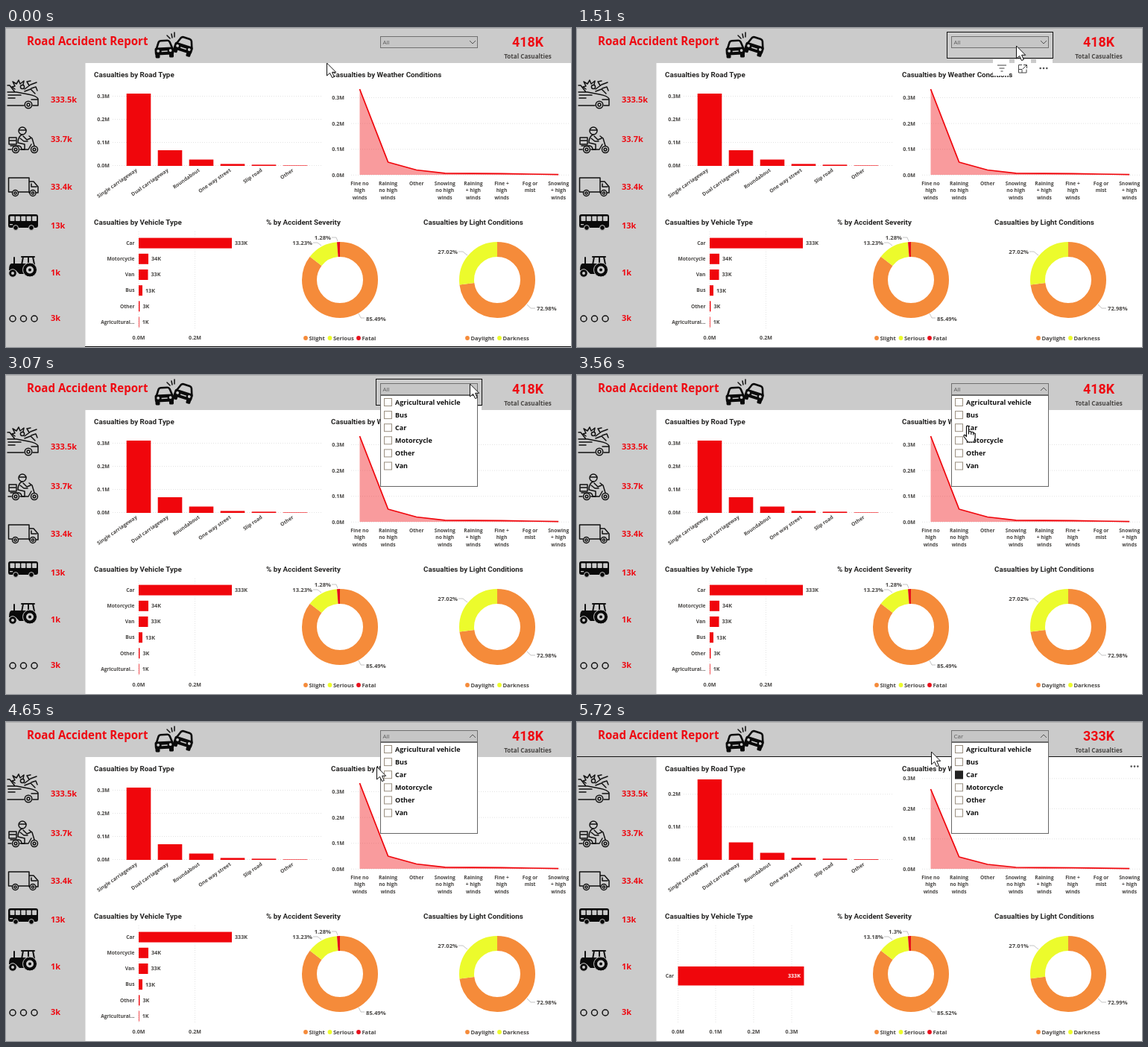
Animation, 758 px wide and 428 px high, one loop 8000 ms. Source, as an HTML page:

```html
<!DOCTYPE html>
<html lang="en">
<head>
<meta charset="utf-8">
<title>Road Accident Report</title>
<style>
html, body { margin: 0; width: 100%; height: 100%; overflow: hidden; background: #fff; }
svg { display: block; width: 758px; height: 428px; }
text { font-family: "Open Sans", "Noto Sans", sans-serif; font-weight: 700; fill: #484644; }
.din { font-family: Roboto, Arial, sans-serif; font-weight: 700; fill: #252423; }
.red { font-weight: 700; fill: #ee0a12; }
.grid { stroke: #dcdcdc; stroke-width: .8; stroke-dasharray: 1 2; fill: none; }
.lead { stroke: #b5b5b5; stroke-width: .8; fill: none; }
.line { fill: none; stroke: #111; stroke-width: 1.5; stroke-linecap: round; stroke-linejoin: round; }
.hover { fill: none; stroke: #111; stroke-width: 1; }
</style>
</head>
<body>
<svg id="stage" viewBox="0 0 758 428"></svg>
<script>
const LOOP = 8000, RED = '#f0060c', ORANGE = '#f58b3a', YELLOW = '#ecfb2c', GREY = '#cbcbcb';
const stage = document.getElementById('stage');

// Markup helpers
const text = (x, cy, s, size, anchor = 'start', attrs = '') =>
  `<text x="${x}" y="${cy + size * .34}" font-size="${size}" text-anchor="${anchor}" ${attrs}>${s}</text>`;
const rect = (x, y, w, h, fill, attrs = '') =>
  `<rect x="${x}" y="${y}" width="${w}" height="${h}" fill="${fill}" ${attrs}/>`;
const circle = (x, y, r, attrs = '') => `<circle cx="${x}" cy="${y}" r="${r}" ${attrs}/>`;
const path = (d, attrs = 'class="line"') => `<path d="${d}" ${attrs}/>`;
const group = (id, body) => `<g id="${id}">${body}</g>`;
const title = (x, y, s) => text(x, y, s, 9.8, 'start', 'class="din"');
const mix = (a, b, p) => a + (b - a) * p;

function crashCar(x, y, turn) {
  return `<g transform="translate(${x} ${y}) rotate(${turn})">` +
    path('M-10-1L-7-9Q-6-11-4-11H5Q7-11 8-9L11-1', 'fill="none" stroke="#0a0a0a" stroke-width="2.6"') +
    rect(-12.5, -2, 25.5, 10, '#0a0a0a', 'rx="2.5"') +
    rect(-12, 5, 6, 7, '#0a0a0a', 'rx="1.5"') + rect(6.5, 5, 6, 7, '#0a0a0a', 'rx="1.5"') +
    circle(-8, 2.5, 1.9, `fill="${GREY}"`) + circle(8.5, 2.5, 1.9, `fill="${GREY}"`) +
    rect(-3.5, 2.5, 8, 1.5, GREY) + '</g>';
}

function icons() {
  const wheel = (x, y, r) => circle(x, y, r, 'class="line"') + circle(x, y, r * .4, 'class="line"');
  const crash = crashCar(212, 28, -3) + crashCar(238.500, 24, 18) +
    path('M223 13L222 8M226 12V6M220 14L216 10');
  const hit = path('M2 86H14L30 89Q41 91 43 95V104H36M24 104H2M3 90H20M12 86L5 77H2M34 96H42M3 94H12') +
    wheel(30, 103, 4.8) +
    path('M12 82L8 79L12 78L9 72L14 75L17 70L19 75L24 71L23 76') +
    circle(22, 79, 2.6, 'class="line"') +
    path('M25 82L33 76L41 73M25 85L33 82L39 88M31 77L28 72L33 71M34 81L40 79L42 84');
  const scooter = circle(22, 138, 5, 'class="line"') + path('M18 137H27M22 143Q16 145 16 154L25 156L25 163H19') +
    path('M23 145L28 150L33 148M31 145L35 148L38 158M19 148L24 152H29') +
    rect(4, 147, 10, 9, 'none', 'class="line"') + path('M5 151H13M6 158H17Q21 159 21 163H30L34 156M3 163H7') +
    wheel(13, 163, 4.5) + wheel(38, 163, 4.5);
  const van = path('M8 220H3.500V201H31V220H17M31 206H37L43 213V221H40M32 221H31M34 209V213H41') +
    wheel(12.500, 221.500, 4) + wheel(36, 221.500, 4);
  let bus = rect(3, 250, 40, 18, '#0a0a0a', 'rx="3"');
  for (let i = 0; i < 5; i++) bus += rect(5.5 + i * 7.4, 252.5, 6, 6.5, GREY, 'rx=".8"');
  bus += rect(5, 263, 4, 1.3, GREY);
  for (const x of [13, 34]) bus += circle(x, 268, 3.4, `fill="#0a0a0a" stroke="${GREY}"`);
  const tractor = '<g transform="translate(46 0) scale(-1 1)">' +
    path('M8 307H25M10 307L8 317M23 307L25 318M16 308V316', 'class="line" style="stroke-width:2"') +
    path('M24 316H39Q42 317 42 325H33L28 330H22L18 316Z', 'fill="#0a0a0a"') +
    path('M35 316V308', 'class="line" style="stroke-width:2"') +
    circle(14, 324.5, 9.5, `fill="#0a0a0a" stroke="${GREY}"`) + circle(14, 324.5, 5, `fill="${GREY}"`) + circle(14, 324.5, 2) +
    circle(37, 329, 5.3, `fill="#0a0a0a" stroke="${GREY}"`) + circle(37, 329, 2, `fill="${GREY}"`) + '</g>';
  const dots = [9, 23.5, 38].map(x => circle(x, 390, 4, 'class="line"')).join('');
  return crash + hit + scooter + van + bus + tractor + dots;
}

function roadChart(p) {
  const a = [97, 21, 8.5, 2.6, 1.6, .6], b = [108, 23.500, 9.5, 2.8, 1.7, .8];
  const step = mix(31, 43.8, p);
  let out = '';
  for (let i = 0, y = 184.5; y > 72; y = 184.5 - step * ++i)
    out += path(`M143 ${y}H424`, 'class="grid"') + text(139, y, `0.${i}M`, 7.1, 'end');
  a.forEach((v, i) => {
    const h = mix(v, b[i], p);
    out += rect(161.700 + i * 42, 185 - h, 32.6, h, RED);
  });
  return out;
}

function weatherChart(p) {
  const a = [115, 17, 6.500, 2.2, 1.8, 1.6, 1, .3], b = [107, 16, 6, 2, 1.7, 1.5, .9, .3];
  const step = mix(34.6, 40.5, p);
  let out = '';
  for (let i = 0; i < 4; i++) {
    const y = 197.3 - step * i;
    out += path(`M463 ${y}H755`, 'class="grid"') + text(454, y, `0.${i}M`, 7.1, 'end');
  }
  const pts = a.map((v, i) => `${474.500 + i * 38.1} ${197 - mix(v, b[i], p)}`).join('L');
  return out + path(`M474.500 197L${pts}V197Z`, 'fill="#f0060c" fill-opacity=".4"') +
    path(`M${pts}`, `fill="none" stroke="${RED}" stroke-width="1.7" stroke-linejoin="round"`);
}

function axis(ticks) {
  return ticks.map(([x, s]) => path(`M${x} 273V405`, 'class="grid"') + text(x, 416, s, 7.1, 'middle')).join('');
}

function vehicleAll() {
  const rows = [['Car', 125, '333K'], ['Motorcycle', 13, '34K'], ['Van', 12.5, '33K'],
    ['Bus', 5, '13K'], ['Other', 1.4, '3K'], ['Agricultural...', .7, '1K']];
  return axis([[178, '0.0M'], [253.500, '0.2M']]) + rows.map(([name, w, s], i) => {
    const y = 288.600 + i * 21.2;
    return text(172.500, y, name, 6.7, 'end') + rect(178, y - 7, w, 14, RED) + text(182 + w, y, s, 7.2);
  }).join('');
}

function vehicleCar() {
  return axis([[135.5, '0.0M'], [186, '0.1M'], [237, '0.2M'], [288, '0.3M']]) +
    text(130, 341, 'Car', 6.7, 'end') + rect(135.500, 328, 169, 25.5, RED) +
    text(300, 341, '333K', 7.2, 'end', 'style="fill:#fff"');
}

function donut(x, parts) {
  let from = 0;
  return parts.map(([share, color]) => {
    const arc = circle(x, 338, 41, `fill="none" stroke="${color}" stroke-width="20" pathLength="100"
      stroke-dasharray="${share} ${100 - share}" stroke-dashoffset="${-from}" transform="rotate(-90 ${x} 338)"`);
    from += share;
    return arc;
  }).join('');
}

function severity(slight, serious, fatal) {
  return donut(448, [[slight, ORANGE], [serious, YELLOW], [fatal, '#e8101c']]) +
    path('M412 288H418L423 292M437 281H443L445 286M473 383L476 389H481', 'class="lead"') +
    text(411, 288, serious + '%', 7.7, 'end') + text(436, 281, fatal + '%', 7.7, 'end') +
    text(483, 390, slight + '%', 7.7);
}

function light(day, dark) {
  return donut(659, [[day, ORANGE], [dark, YELLOW]]) +
    path('M607 300H613L619 305M699 371L704 376H710', 'class="lead"') +
    text(606, 300, dark + '%', 7.7, 'end') + text(712, 376, day + '%', 7.7);
}

const legend = items => items.map(([x, s, color]) =>
  circle(x, 416, 2.9, `fill="${color}"`) + text(x + 4.4, 416, s, 7.6)).join('');

function labels() {
  const roads = ['Single carriageway', 'Dual carriageway', 'Roundabout', 'One way street', 'Slip road', 'Other'];
  const skies = ['Fine no|high|winds', 'Raining|no high|winds', 'Other', 'Snowing|no high|winds',
    'Raining|+ high|winds', 'Fine +|high|winds', 'Fog or|mist', 'Snowing|+ high|winds'];
  return roads.map((s, i) => `<g transform="translate(${175 + i * 42} 190) rotate(-35)">${text(0, 0, s, 6.8, 'end')}</g>`).join('') +
    skies.map((s, i) => s.split('|').map((line, k) =>
      text(474.500 + i * 38.1, 208.5 + k * 9.5, line, 6.7, 'middle')).join('')).join('');
}

function dropdown() {
  const names = ['Agricultural vehicle', 'Bus', 'Car', 'Motorcycle', 'Other', 'Van'];
  return rect(502.5, 27.5, 130, 122, '#fff', 'stroke="#666"') + names.map((s, i) => {
    const y = 36.5 + i * 17.1;
    return rect(507.5, y - 5, 10, 10, '#fff', 'stroke="#9a8f80"') +
      text(522, y, s, 9, 'start', 'style="fill:#111"');
  }).join('') + group('tick', rect(507, 65.5, 11, 11, '#222'));
}

const more = (x, y) => [-4.3, 0, 4.3].map(d => circle(x + d, y, 1.3, 'fill="#555"')).join('');
const tools = [558, 587, 616].map(x => rect(x, 42, 22, 22, '#fff')).join('') +
  path('M564 50H576M566.500 54H573.5M568.5 58H571.5', 'fill="none" stroke="#444"') +
  path('M597 49.5H592.5V60H603V55.5M599 49.5H603.5V54M603 50L598 55M592.500 55.500H597V60', 'fill="none" stroke="#444"') +
  more(626, 54);

const counts = [[96, '333.5k'], [149, '33.7k'], [213, '33.4k'], [265, '13k'], [328, '1k'], [389, '3k']];
const total = s => text(700, 19, s, 17.8, 'middle', 'class="din" style="fill:#ee0a12"');
const pick = s => text(505.500, 19.5, s, 8, 'start', 'style="fill:#5c5c5c;font-weight:400"');

stage.innerHTML =
  rect(0, 0, 758, 428, GREY) + rect(0, 0, 758, 1, '#b0b0b0') + rect(106.500, 47, 651.500, 381, '#fff') +
  text(28, 17.5, 'Road Accident Report', 15.1, 'start', 'class="red"') +
  counts.map(([y, s]) => text(60, y, s, 11, 'start', 'class="red"')).join('') + icons() +
  group('totalAll', total('418K')) + group('totalCar', total('333K')) +
  text(700, 38, 'Total Casualties', 8.1, 'middle') +
  title(118, 62.5, 'Casualties by Road Type') + title(436, 62.5, 'Casualties by Weather Conditions') +
  title(118, 260.5, 'Casualties by Vehicle Type') + title(349, 260.5, '% by Accident Severity') +
  title(560, 260.5, 'Casualties by Light Conditions') +
  group('road', '') + group('weather', '') + labels() +
  group('vehicleAll', vehicleAll()) + group('vehicleCar', vehicleCar()) +
  group('sevAll', severity(85.49, 13.23, 1.28)) + group('sevCar', severity(85.52, 13.18, 1.3)) +
  group('lightAll', light(72.98, 27.02)) + group('lightCar', light(72.99, 27.01)) +
  legend([[402, 'Slight', ORANGE], [434.5, 'Serious', YELLOW], [473, 'Fatal', '#e8101c'],
    [619, 'Daylight', ORANGE], [662, 'Darkness', YELLOW]]) +
  group('pageHover', rect(106, 427, 652, 1, '#111')) +
  group('headHover', rect(0, 46, 758, 1, '#111')) +
  group('chartHover', rect(430.5, 50.5, 327, 186, 'none', 'class="hover"')) +
  group('menu', more(748, 59.6)) + group('tools', tools) +
  rect(502.5, 11.5, 130, 15, '#c6c6c6', 'stroke="#707070"') +
  group('pickAll', pick('All')) + group('pickCar', pick('Car')) +
  group('down', path('M622 17L626 21L630 17', 'fill="none" stroke="#555"')) +
  group('up', path('M622 21L626 17L630 21', 'fill="none" stroke="#555"')) +
  group('slicerHover', rect(496.5, 5.5, 142, 35, 'none', 'class="hover"')) +
  group('list', dropdown()) +
  group('ring', circle(0, 0, 11.3, 'fill="none" stroke="#666" stroke-opacity=".4"')) +
  group('arrow', path('M-.5 0V17L3.6 13.4L6.500 19.6L9.3 18.400L6.600 12.300H11.7Z', 'fill="#fff" stroke="#111"')) +
  group('hand', path('M-1.500 1Q0-.800 1.500 1V8L3.500 7.500 5 8.500 7 8.500 8.500 9.800 10.200 10.500V16L8.500 22H.5L-5 14.500Q-5.500 12-3.500 12.500L-1.500 14.500Z' +
    'M1.500 8V11.500M4.800 8.500V12M7.800 9.500V12.500', 'fill="#fff" stroke="#111" stroke-width="1.2" stroke-linejoin="round"'));

const el = {};
stage.querySelectorAll('g[id]').forEach(g => el[g.id] = g);

// Visible spans: name, start, end, ...
const spans = [
  ['pageHover', 0, 560], ['headHover', 900, 1330, 5000, LOOP], ['chartHover', 650, 880, 4720, 4960],
  ['menu', 720, 1300, 4760, LOOP], ['slicerHover', 1400, 3400], ['tools', 1450, 3400],
  ['down', 0, 2560], ['up', 2560, LOOP], ['list', 2560, LOOP], ['tick', 4700, LOOP],
  ['pickAll', 0, 4700], ['pickCar', 4700, LOOP], ['totalAll', 0, 5560], ['totalCar', 5560, LOOP],
  ['sevAll', 0, 5360], ['sevCar', 5360, LOOP], ['lightAll', 0, 5600], ['lightCar', 5600, LOOP],
  ['vehicleAll', 0, 5600], ['vehicleCar', 5600, LOOP], ['ring', 2130, 2360, 4020, 4170],
  ['hand', 3200, 4600], ['arrow', 0, 3200, 4600, LOOP]
];
const track = [[0, 431, 47], [149, 431, 47], [150, 430, 47], [560, 430, 47], [980, 449, 44], [1220, 449, 44],
  [1510, 590, 24], [2000, 622, 11], [2130, 623, 12], [3070, 623, 12], [3560, 524, 68], [3760, 512, 71],
  [4560, 512, 71], [4650, 498, 60], [5210, 476, 40], [LOOP, 476, 40]];

function pointer(t) {
  const i = track.findIndex(k => k[0] > t), [a, b] = [track[i - 1], track[i]];
  const p = (t - a[0]) / (b[0] - a[0]);
  return [mix(a[1], b[1], p), mix(a[2], b[2], p)].map(Math.round);
}

let shown = -1;
function frame() {
  const t = performance.now() % LOOP;
  for (const [name, ...s] of spans) {
    const on = s.some((from, i) => i % 2 === 0 && t >= from && t < s[i + 1]);
    el[name].setAttribute('display', on ? 'inline' : 'none');
  }
  const [x, y] = pointer(t);
  for (const name of ['arrow', 'hand', 'ring']) el[name].setAttribute('transform', `translate(${x} ${y})`);
  const p = Math.min(1, Math.max(0, (t - 5560) / 150));
  if (p !== shown) {
    el.road.innerHTML = roadChart(p);
    el.weather.innerHTML = weatherChart(p);
    shown = p;
  }
  requestAnimationFrame(frame);
}
frame();
</script>
</body>
</html>
```
